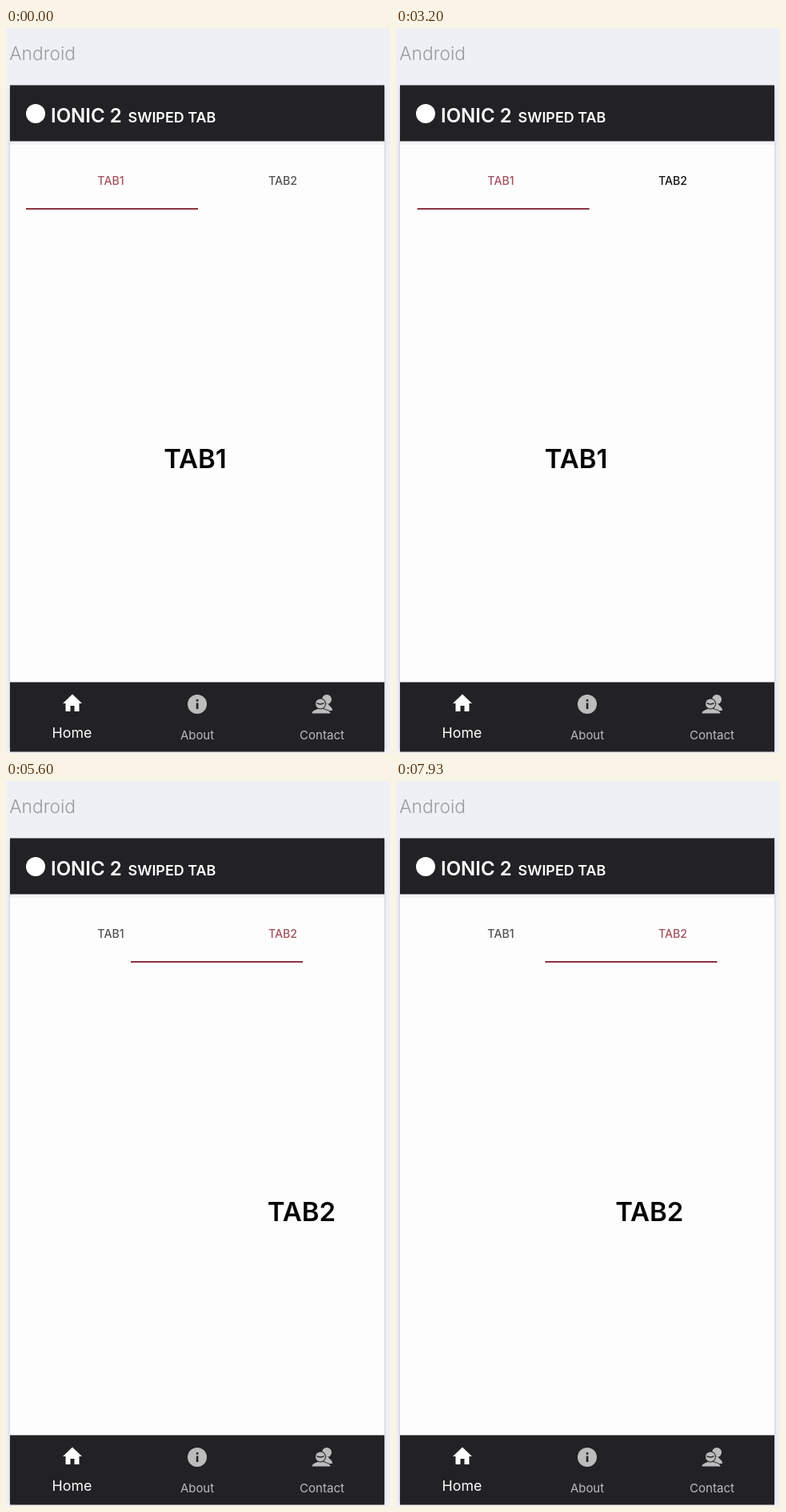
Write an HTML page with a canvas that moves like this. It is 480x906 px and loops after 8 s.

```html
<!DOCTYPE html>
<html lang="en">
<head>
<meta charset="utf-8">
<title>Swiped tab</title>
<style>
html, body { margin: 0; width: 100%; height: 100%; overflow: hidden; background: #eef0f5; }
canvas { display: block; }
</style>
</head>
<body>
<canvas id="stage" width="480" height="906"></canvas>
<script>
const ctx = document.getElementById('stage').getContext('2d');
const LOOP = 8000, STEP = 200 / 3;
const PAGE = 430, TAB = PAGE / 2, LAG = 40;
const BAR = '#222124', DIM = '#bcbcbd';

// Each drag or release moves the pages on to a new scroll position.
const moves = [
  { from: 1200, to: 1936, x: PAGE },
  { from: 2110, to: 2730, x: 0 },
  { from: 3113, to: 4033, x: PAGE },
  { from: 4040, to: 4540, x: 0 },
  { from: 4800, to: 4989, x: -45 },
  { from: 5100, to: 5950, x: PAGE },
  { from: 6230, to: 6391, x: 252 },
  { from: 6490, to: 6930, x: PAGE },
  { from: 7470, to: 7770, x: 292 },
  { from: 7800, to: 8128, x: PAGE }
];

const clamp = (v, lo, hi) => Math.min(hi, Math.max(lo, v));
const ease = u => 1 - (1 - u * u) ** 3;

function scrollAt(t) {
  let x = 0;
  for (const m of moves) x += (m.x - x) * ease(clamp((t - m.from) / (m.to - m.from), 0, 1));
  return x;
}

function text(str, x, y, size, weight, color, align = 'left') {
  ctx.font = `${weight} ${size}px Inter, "Liberation Sans", sans-serif`;
  ctx.textAlign = align;
  ctx.fillStyle = color;
  ctx.fillText(str, x, y);
}

function box(x, y, w, h, color) {
  ctx.fillStyle = color;
  ctx.fillRect(x, y, w, h);
}

function disc(x, y, r, color) {
  ctx.fillStyle = color;
  ctx.beginPath();
  ctx.arc(x, y, r, 0, Math.PI * 2);
  ctx.fill();
}

function shape(path, color, line = 0) {
  const p = new Path2D(path);
  ctx.fillStyle = color;
  ctx.fill(p);
  if (line) {
    ctx.strokeStyle = BAR;
    ctx.lineWidth = line;
    ctx.stroke(p);
  }
}

function frame() {
  box(0, 0, 480, 906, '#eef0f5');
  text('Android', 4.2, 40, 22.8, 300, '#9b9b9e');
  ctx.save();
  ctx.shadowColor = 'rgba(0,0,0,.25)';
  ctx.shadowBlur = 3;
  box(5, 74, 468, 828, '#fefdfe');
  ctx.restore();
  box(5, 142, 468, 4, '#f4f4f5');
  box(5, 71.5, 468, 70, BAR);
  disc(37, 107, 12, '#fff');
  text('IONIC 2', 56, 118, 24, 600, '#fff');
  text('SWIPED TAB', 152.5, 118, 17.9, 600, '#fff');
}

function footer() {
  box(5, 817.5, 468, 87, BAR);
  shape('M83 832.5L95 844H91.5V854H85.5V847H80.5V854H74.5V844H71Z', '#fff');
  text('Home', 82.5, 887, 17.8, 400, '#fff', 'center');

  disc(239, 845, 12, DIM);
  box(237.8, 839, 2.6, 2.6, BAR);
  box(237.8, 843.5, 2.6, 7.5, BAR);
  text('About', 239, 889, 14.9, 400, DIM, 'center');

  disc(401, 839, 6, DIM);
  shape('M393 853C395 848 398 848 399 845H403C404 848 408 848 408 853Z', DIM);
  shape('M382 857C382 852 388 852 390 850H396C398 852 406 852 406 857Z', DIM, 1);
  disc(393, 844.5, 7, BAR);
  disc(393, 844.5, 6, DIM);
  shape('M388.5 843C391 844.5 395 844.5 397.5 843V844.5C395 846 391 846 388.5 844.5Z', BAR);
  text('Contact', 395, 889, 15.1, 400, DIM, 'center');
}

function draw(time) {
  const t = Math.floor((time % LOOP + 5) / STEP) * STEP;
  const scroll = scrollAt(t);
  const shift = clamp(scrollAt(t - LAG) / 2, 0, TAB);
  const second = scroll > TAB;
  const idle = t > 2100 && t < 4400 ? '#161517' : '#525154', red = '#a4525f';

  frame();
  text('TAB1', 131, 196, 14.2, 500, second ? idle : red, 'center');
  text('TAB2', 346, 196, 14.2, 500, second ? red : idle, 'center');
  box(25 + shift, 225, TAB, 2, '#8c3243');

  ctx.save();
  ctx.beginPath();
  ctx.rect(25, 230, PAGE, 580);
  ctx.clip();
  ['TAB1', 'TAB2'].forEach((name, i) =>
    text(name, 236.5 + i * PAGE - scroll, 550, 33, 600, '#050505', 'center'));
  ctx.restore();
  footer();
}

const start = performance.now();
function tick() {
  draw(performance.now() - start);
  requestAnimationFrame(tick);
}
tick();
</script>
</body>
</html>
```
